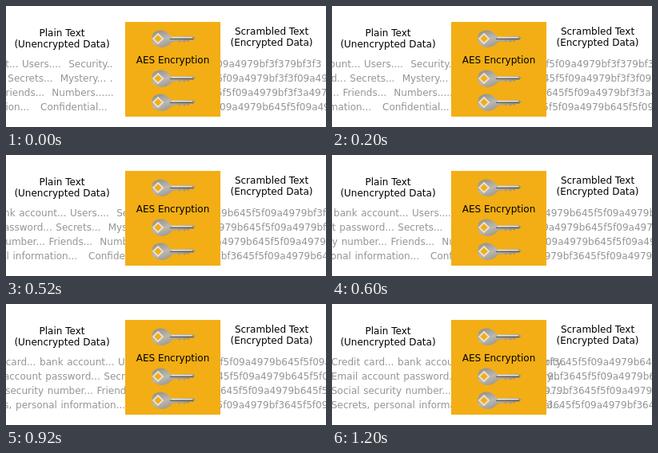
An HTML page for the animation above (1.4 s loop, 400x152 px).

```html
<!DOCTYPE html>
<html lang="en">
<head>
<meta charset="utf-8">
<title>AES Encryption</title>
<style>
  html, body { margin: 0; width: 100%; height: 100%; overflow: hidden; background: #fff; }
  svg { display: block; }
  text { font: 12px "DejaVu Sans", Verdana, sans-serif; white-space: pre; }
  .flow text { fill: #959595; word-spacing: .8px; }
  .label { text-anchor: middle; }
</style>
</head>
<body>
<svg width="400" height="152" viewBox="0 0 400 152">
  <defs>
    <linearGradient id="metal" x1="0" y1="0" x2="1" y2="1">
      <stop offset="0" stop-color="#8f8a80"/>
      <stop offset=".4" stop-color="#bcb8af"/>
      <stop offset="1" stop-color="#757068"/>
    </linearGradient>
    <clipPath id="right"><rect x="268" width="132" height="152"/></clipPath>
    <!-- key centred on y = 0 -->
    <g id="key">
      <path d="M183 -5Q186 -10.500 194 -10.500Q201 -10 205 -4L208 -2.500L233 -3L236.500 -1L234 2L230 1.500L228 4L226 2.500L223 4.500L220 2.500L217 4.500L214 3L208 4L205 7Q200 11 194 11Q186 10 183 5Q181.500 0 183 -5Z"
        fill="url(#metal)"/>
      <path d="M207 -1.500H233" stroke="#e2dfd7" stroke-width="1.400"/>
      <path d="M205 .5H234" stroke="#5d5a54"/>
      <path d="M190 -6L196 0L190 6L184 0Z" fill="#f2ae14" stroke="#e8e3d6" stroke-width="1.800"/>
    </g>
  </defs>

  <g class="flow" id="plain"></g>
  <g class="flow" clip-path="url(#right)"><g id="cipher"></g></g>

  <rect x="149" y="20" width="119" height="119" fill="#f2ae14"/>
  <use href="#key" y="41"/>
  <use href="#key" y="91"/>
  <use href="#key" y="121"/>

  <g class="label">
    <text x="70" y="38">Plain Text</text>
    <text x="70" y="52">(Unencrypted Data)</text>
    <text x="208.500" y="72">AES Encryption</text>
    <text x="332" y="36">Scrambled Text</text>
    <text x="332" y="50">(Encrypted Data)</text>
  </g>
</svg>
<script>
const STEP = 20, LAST = 8, FRAME = 200, LOOP = 1400;
const plain = document.getElementById('plain');
const cipher = document.getElementById('cipher');

// Each row: plain text, cipher text, cipher start at the end of the run
const rows = [
  ['Credit card... bank account... Users....  Security..',
   'bf3645f5f09a4979b645f5f09a4979bf3f379bf3f3', 265],
  ['Email account password... Secrets...  Mystery... .',
   '9bf3645f5f09a4979b645f5f09a4979bf3f3f09a4979b', 269.4],
  ['Social security number... Friends...  Numbers......',
   '979bf3645f5f09a4979b645f5f09a4979bf3f3a4979b', 265.5],
  ['Secrets, personal information...   Confidential...',
   'bf3645f5f09a4979bf3645f5f09a4979b645f5f09a4979b', 257]
];

function addText(parent, x, y, content) {
  const node = document.createElementNS('http://www.w3.org/2000/svg', 'text');
  node.setAttribute('x', x);
  node.setAttribute('y', y);
  node.textContent = content;
  parent.append(node);
}

rows.forEach(([words, hex, x], i) => {
  const y = 77 + i * 18;
  addText(plain, -1, y, words);
  addText(cipher, x, y, hex);
});

function draw(now) {
  const tick = Math.floor(now % LOOP / FRAME);
  const step = Math.min(LAST, Math.floor(tick * 1.5));
  const move = `translate(${(step - LAST) * STEP} 0)`;
  plain.setAttribute('transform', move);
  cipher.setAttribute('transform', move);
}

const start = performance.now();
function loop() {
  draw(performance.now() - start);
  requestAnimationFrame(loop);
}
loop();
</script>
</body>
</html>
```
